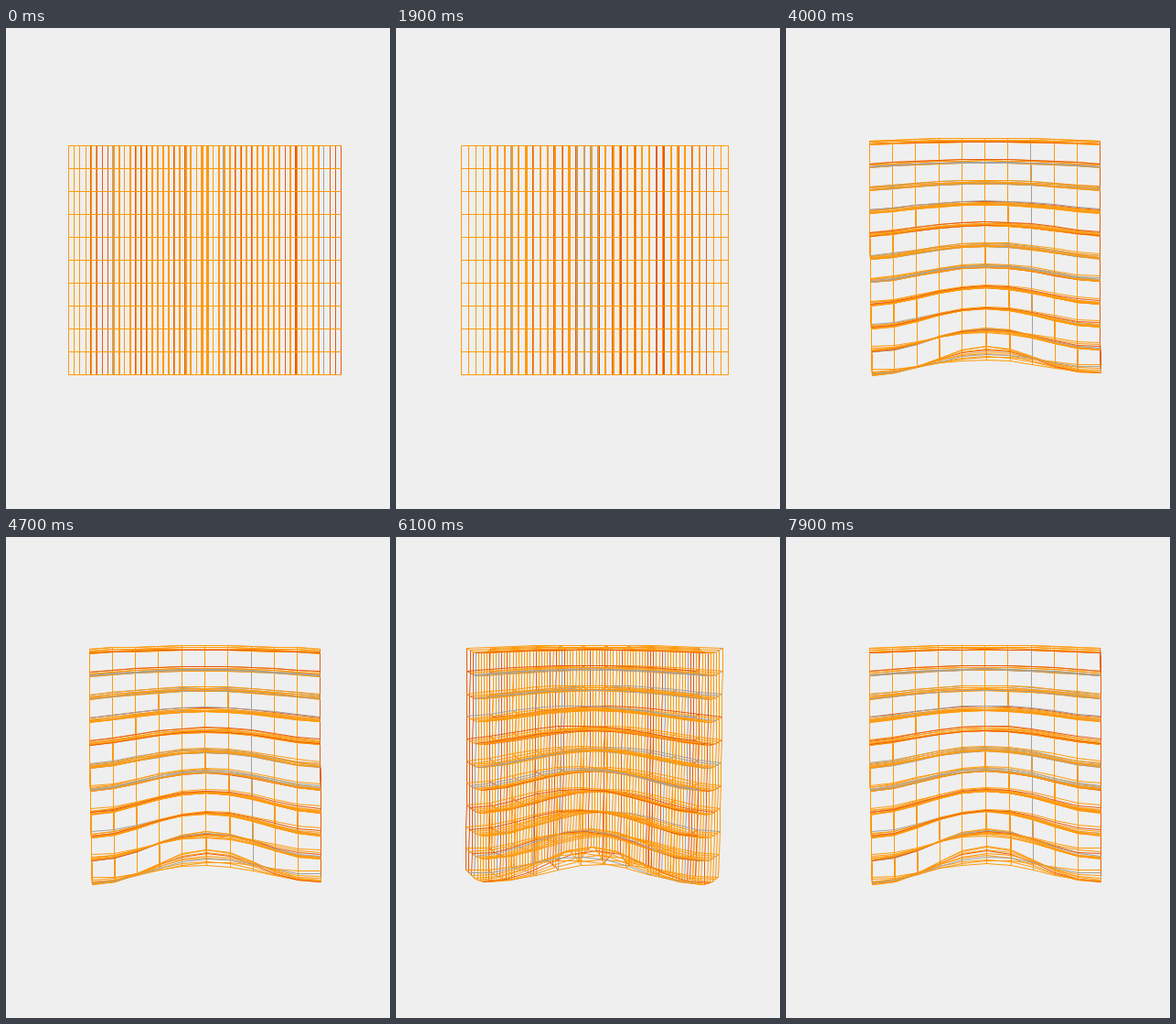
Recreate the animation shown at these times as an HTML page with a canvas. Size 420 by 525 pixels, loop 8000 ms.

```html
<!DOCTYPE html>
<html lang="en">
<head>
<meta charset="utf-8">
<title>Wire block</title>
<style>
html, body { margin: 0; width: 100%; height: 100%; overflow: hidden; background: #efefef; }
canvas { display: block; }
</style>
</head>
<body>
<canvas id="stage" width="420" height="525"></canvas>
<script>
const ctx = document.getElementById('stage').getContext('2d');
const LOOP = 8000, STEP = 100;
const CELL = 25, SIZE = [10, 10, 9];
const CX = 217, CY = 253;
const ORANGE = '#ff9a0c', RED = '#e8590f', GRAY = '#a3a19d';

// One turn takes 25 steps, followed by a rest of 24 steps.
const TURN = 25, REST = 24;

function yawAt(t) {
  const step = (t / STEP + 1) % (TURN + REST);
  return Math.min(step / TURN, 1) * 2 * Math.PI;
}

// The block starts to bend after a while and settles smoothly.
function bendAt(t) {
  const s = Math.max(0, t - 1850) / 1800;
  return 1 - Math.exp(-s * s);
}

function hash(n) {
  const s = Math.sin(n * 12.9898 + 4.1) * 43758.5453;
  return s - Math.floor(s);
}

function pick(seed, red, gray) {
  const h = hash(seed);
  return h < red ? RED : h < red + gray ? GRAY : ORANGE;
}

// u and w run from -1 to 1 across the block, v from 0 at the top to 1.
function bendOffset(u, v, w) {
  const arch = Math.pow(Math.max(0, 1 - u * u), 1 + 1.5 * v);
  const deep = v ** 6;
  const rise = 1.5 + 5.5 * w * w
    + (3.5 + 29 * v) * arch * (1 - .5 * deep * w * w)
    + 7 * deep * Math.exp(-6 * (u * u + w * w))
    + v * v * (4.2 * u * w + 2.2 * u + 1.7 * w);
  const dx = 1.5 * u + v * v * (2 - 1.5 * u + 11 * u * Math.exp(-8 * u * u));
  return [dx, -rise, 7.5 * v * v];
}

function project(yaw, bend, cell) {
  const [u, y, w] = cell.map((n, axis) => n / SIZE[axis] * 2 - 1);
  const base = [u, y, w].map((n, axis) => n * SIZE[axis] * CELL / 2);
  const [px, py, pz] = bendOffset(u, (y + 1) / 2, w).map((d, axis) => base[axis] + bend * d);
  return [
    Math.round(CX + px * Math.cos(yaw) + pz * Math.sin(yaw)) + .5,
    Math.round(CY + py) + .5
  ];
}

function drawAxis(axis, place, colorOf) {
  const [a, b] = [0, 1, 2].filter(n => n !== axis);
  for (let i = 0; i <= SIZE[a]; i++) {
    for (let j = 0; j <= SIZE[b]; j++) {
      const cell = [0, 0, 0];
      cell[a] = i;
      cell[b] = j;
      ctx.beginPath();
      for (let n = 0; n <= SIZE[axis]; n++) {
        cell[axis] = n;
        ctx.lineTo(...place(cell));
      }
      ctx.strokeStyle = colorOf(axis * 300 + i * 11 + j);
      ctx.stroke();
    }
  }
}

function draw(t) {
  const yaw = yawAt(t), bend = bendAt(t);
  const place = cell => project(yaw, bend, cell);
  const level = seed => bend < .02 ? ORANGE : pick(seed, .17, .12);
  const upright = seed => pick(seed, .22, .06);

  ctx.fillStyle = '#efefef';
  ctx.fillRect(0, 0, 420, 525);
  ctx.lineWidth = 1;
  drawAxis(2, place, level);
  drawAxis(1, place, upright);
  drawAxis(0, place, level);
}

// The view is a window a little narrower than the block's diagonal.
ctx.beginPath();
ctx.rect(54, 0, 327, 525);
ctx.clip();
document.body.style.background = '#efefef';

const start = performance.now();
let shown = -1;
function tick() {
  const t = Math.floor((performance.now() - start) % LOOP / STEP) * STEP;
  if (t !== shown) draw(shown = t);
  requestAnimationFrame(tick);
}
tick();
</script>
</body>
</html>
```
